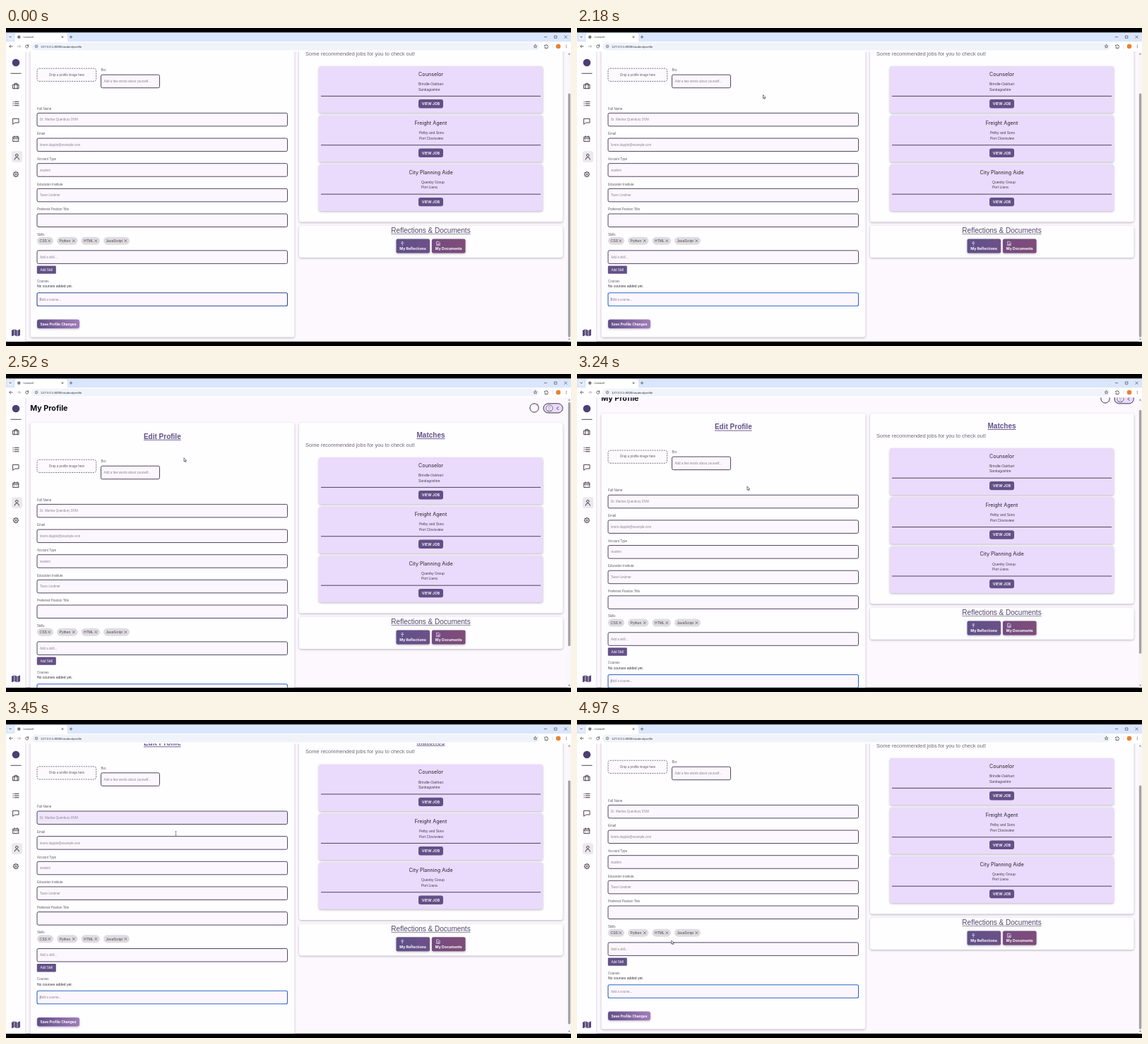
These frames come from a looping animation (800 px wide and 450 px high, 5 s). An HTML page with a canvas:

```html
<!DOCTYPE html>
<html lang="en">
<head>
<meta charset="utf-8">
<title>Profile</title>
<style>
html, body { margin: 0; width: 100%; height: 100%; overflow: hidden; background: #000; }
canvas { display: block; width: 800px; height: 450px; }
</style>
</head>
<body>
<canvas id="stage"></canvas>
<script>
const LOOP = 5000, MAX_SCROLL = 64;
const SANS = '"Liberation Sans", Arial, sans-serif', INTER = 'Inter, sans-serif';
const INK = '#3b3450', PURPLE = '#635087', GREY = '#8a8590';

const canvas = document.getElementById('stage');
const ctx = canvas.getContext('2d');
const dpr = window.devicePixelRatio || 1;
canvas.width = 800 * dpr;
canvas.height = 450 * dpr;

const clamp = v => Math.max(0, Math.min(1, v));
const lerp = (a, b, u) => a + (b - a) * u;
const ease = u => { u = clamp(u); return u * u * (3 - 2 * u); };
const mix = (a, b, u) => `rgb(${a.map((v, i) => Math.round(lerp(v, b[i], u)))})`;

function box(x, y, w, h, r, fill, stroke, lw = 1) {
  ctx.beginPath();
  ctx.roundRect(x, y, w, h, r);
  if (fill) { ctx.fillStyle = fill; ctx.fill(); }
  if (stroke) { ctx.strokeStyle = stroke; ctx.lineWidth = lw; ctx.stroke(); }
}

function raised(x, y, w, h, r, fill) {
  ctx.save();
  ctx.shadowColor = 'rgba(40,30,60,.32)';
  ctx.shadowBlur = 3 * dpr;
  ctx.shadowOffsetY = dpr;
  box(x, y, w, h, r, fill);
  ctx.restore();
}

function text(s, x, y, size, color, { font = SANS, weight = 400, align = 'left', line = false } = {}) {
  ctx.font = `${weight} ${size}px ${font}`;
  ctx.textAlign = align;
  ctx.fillStyle = color;
  ctx.fillText(s, x, y);
  if (line) {
    const w = ctx.measureText(s).width;
    ctx.fillRect(align === 'center' ? x - w / 2 : x, y + 1.2, w, weight > 500 ? 0.9 : 0.6);
  }
}

function dot(x, y, r, fill, stroke, lw = 1) {
  ctx.beginPath();
  ctx.arc(x, y, r, 0, 7);
  if (fill) { ctx.fillStyle = fill; ctx.fill(); }
  if (stroke) { ctx.strokeStyle = stroke; ctx.lineWidth = lw; ctx.stroke(); }
}

// Paths are drawn around (0, 0).
function icon(d, x, y, color, lw = 1, fill) {
  ctx.save();
  ctx.translate(x, y);
  const p = new Path2D(d);
  ctx.lineCap = ctx.lineJoin = 'round';
  if (fill) { ctx.fillStyle = fill; ctx.fill(p); }
  if (color) { ctx.strokeStyle = color; ctx.lineWidth = lw; ctx.stroke(p); }
  ctx.restore();
}

function gradient(x0, x1, a, b) {
  const g = ctx.createLinearGradient(x0, 0, x1, 0);
  g.addColorStop(0, a);
  g.addColorStop(1, b);
  return g;
}

// Page content, in unscrolled coordinates
const row = i => 184.4 + 35.65 * i;
const fields = [
  { x: 134.5, y: 130.2, w: 83, label: 'Bio:', hint: 'Add a few words about yourself...' },
  ...[
    ['Full Name', 'Dr. Marlow Quenbury DVM'],
    ['Email', 'lorem.dapple@example.com'],
    ['Account Type', 'student'],
    ['Education Institute', 'Tavor-Lindmer'],
    ['Preferred Position Title', '']
  ].map(([label, hint], i) => ({ x: 44, y: row(i), w: 354.5, label, hint })),
  { x: 44, y: 378.9, w: 354.5, hint: 'Add a skill...' },
  { x: 44, y: 438.7, w: 354.5, hint: 'Add a course...', focus: true }
];
const FIELD_H = 18.5;

const chips = [['CSS', 44, 67], ['Python', 72, 101.5], ['HTML', 106.5, 133], ['JavaScript', 138, 175]];
const jobs = [
  ['Counselor', 'Brindle-Oakhart', 'Santiagoshire', 584],
  ['Freight Agent', 'Pelby and Sons', 'Port Clovisview', 585],
  ['City Planning Aide', 'Quenby Group', 'Port Liana', 588]
];

// Motion
function scrollAt(t) {
  if (t < 2800) return MAX_SCROLL * (1 - ease((t - 2200) / 310));
  return MAX_SCROLL * ease((t - 3113) / 439);
}

const SHOW_POINTER = 1900;
const trail = [
  [1900, 200, 108], [2180, 263.5, 95], [2520, 252, 119], [3200, 241, 159.3],
  [3450, 240.5, 160], [3850, 240.5, 160], [4850, 133.8, 312.2]
];

function pointerAt(t) {
  let i = 0;
  while (i < trail.length - 2 && t > trail[i + 1][0]) i++;
  const [a, b] = [trail[i], trail[i + 1]];
  const u = ease((t - a[0]) / (b[0] - a[0]));
  return [lerp(a[1], b[1], u), lerp(a[2], b[2], u)];
}

function hits(f, t) {
  if (t < SHOW_POINTER) return false;
  const [x, y] = pointerAt(t), top = f.y - scrollAt(t);
  return x > f.x && x < f.x + f.w && y > top && y < top + FIELD_H;
}

// Hover follows the pointer late and fades over 100 ms.
function hover(f, t) {
  let n = 0;
  for (let d = 65; d < 165; d += 10) n += hits(f, t - d);
  return n / 10;
}

function drawField(f, t) {
  if (f.label) text(f.label, f.x, f.y - 4.8, 4.45, '#625d69');
  const fill = mix([252, 247, 254], [237, 226, 250], hover(f, t));
  const edge = f.focus ? mix([45, 50, 100], [44, 104, 196], clamp((t + 70) / 170)) : INK;
  box(f.x, f.y, f.w, FIELD_H, 2, fill, edge, f.focus ? 1.1 : 0.9);
  text(f.hint, f.x + 3.9, f.y + 10.9, 4.5, GREY);
  if (f.focus && t % 1000 < 500) {
    ctx.fillStyle = '#555';
    ctx.fillRect(f.x + 3.9, f.y + 6.7, 0.5, 5);
  }
}

function drawForm(t) {
  raised(34.5, 69, 374, 432.5, 3, '#fefdff');
  text('Edit Profile', 221.3, 91.6, 10, PURPLE, { weight: 700, align: 'center', line: true });

  ctx.setLineDash([2, 1.3]);
  box(44, 121.2, 83.7, 18.2, 3, '#fdfaff', '#57515f', 0.8);
  ctx.setLineDash([]);
  text('Drop a profile image here', 86, 131.6, 4.45, '#625d69', { align: 'center' });

  fields.forEach(f => drawField(f, t));

  text('Skills', 44, 357.6, 4.45, '#625d69');
  for (const [name, a, b] of chips) {
    box(a, 359.7, b - a, 11, 5.5, '#dedce0');
    text(name, a + 3.6, 367, 5, '#45414b');
    icon('M-1.6-1.6L1.6 1.6M1.6-1.6L-1.6 1.6', b - 5.7, 365.2, '#55505c', 0.7);
  }
  box(43.8, 400.5, 27, 11.3, 1.2, PURPLE);
  text('Add Skill', 57.3, 407.7, 4.5, '#fff', { align: 'center' });

  text('Courses', 44, 423.5, 4.45, '#625d69');
  text('No courses added yet.', 44, 431.2, 5, '#353139');

  raised(44, 476.5, 60, 12.4, 3, gradient(44, 104, '#624e88', '#a27db9'));
  text('Save Profile Changes', 74, 484.5, 4.9, '#fff', { font: INTER, weight: 700, align: 'center' });
}

function drawJob([title, firm, place, x], i) {
  const y = 118.3 + 69.4 * i;
  raised(443, y, 317, 66, 3, '#eadafb');
  text(title, 601.5, y + 13.4, 7.2, '#27222f', { font: INTER, align: 'center' });
  text(firm, x, y + 26.7, 5, '#45404f');
  text(place, x, y + 34.2, 5, '#45404f');
  ctx.fillStyle = INK;
  ctx.fillRect(446, y + 41.6, 311, 0.9);
  box(584, y + 46.8, 35, 12.4, 3, PURPLE);
  text('VIEW JOB', 601.5, y + 54.9, 5.2, '#fff', { font: INTER, weight: 600, align: 'center' });
}

function drawSide() {
  raised(415, 69, 373.5, 269.5, 3, '#fefdff');
  text('Matches', 601.5, 90, 10, PURPLE, { weight: 700, align: 'center', line: true });
  text('Some recommended jobs for you to check out!', 424, 102.8, 7.5, '#6f6a76');
  jobs.forEach(drawJob);

  raised(415, 344, 373.5, 45, 3, '#fefdff');
  text('Reflections & Documents', 601.5, 354.2, 10, '#51486a', { align: 'center', line: true });
  raised(552.5, 362.6, 47.5, 20, 2, gradient(552, 600, '#5f5089', '#6d5088'));
  raised(603, 362.6, 47.5, 20, 2, gradient(603, 651, '#734c80', '#7f4c79'));
  const label = { font: INTER, weight: 700 };
  text('My Reflections', 557.3, 378.2, 5.15, '#fff', label);
  text('My Documents', 607.8, 378.2, 5.15, '#fff', label);
  icon('M0 2.6V-1M-1.7-.6H1.7M-.8-2.4H.8', 561.2, 369, '#f0e8f8', 0.7);
  icon('M-2-2.8H.7L2.2-1.3V2.8H-2ZM-.8.2H1M-.8 1.5H1', 612, 369, '#f0e8f8', 0.7);
}

function drawHeading() {
  text('My Profile', 34.3, 51.6, 10.7, '#0e0c12', { font: INTER, weight: 700 });
  dot(748, 48, 6.2, '#fbf6ff', INK, 1);
  dot(752.3, 43.4, 1.2, '#d8606f');
  box(761, 41.8, 27.3, 13.2, 6.6, '#eadafb', INK, 1);
  dot(769.4, 48.4, 4.6, '#f4eefa', INK, 0.7);
  dot(769.4, 47.4, 1.5, null, '#77707f', 0.6);
  icon('M-2.6 1.9Q0-.8 2.6 1.9', 769.4, 49.9, '#77707f', 0.6);
  icon('M1-2L-1 0L1 2', 781, 48.5, INK, 1);
}

function drawPage(t) {
  const s = scrollAt(t);
  ctx.save();
  ctx.beginPath();
  ctx.rect(0, 33, 800, 410.7);
  ctx.clip();
  ctx.fillStyle = '#fcf8fe';
  ctx.fillRect(0, 33, 800, 411);
  ctx.translate(0, -s);
  drawHeading();
  drawForm(t);
  drawSide();
  ctx.restore();

  ctx.fillStyle = '#f8f6fa';
  ctx.fillRect(795, 33, 5, 410.7);
  box(795.9, 40 + 0.82 * s, 3.3, 345, 1.6, '#a3a1a6');
  icon('M-1.4 1L0-1L1.4 1Z', 797.5, 36.6, null, 0, '#77757a');
  icon('M-1.4-1L0 1L1.4-1Z', 797.5, 440.7, null, 0, '#77757a');
}

function drawNav() {
  ctx.fillStyle = '#fefdff';
  ctx.fillRect(0, 33, 28, 410.7);
  ctx.fillStyle = '#d9d5df';
  ctx.fillRect(27.5, 33, 0.8, 410.7);
  dot(14, 49, 5.3, '#4c3f73');
  ctx.fillStyle = '#39343f';
  ctx.fillRect(6.5, 63.8, 15, 0.9);
  box(8, 174.3, 15, 15.6, 3, '#ebe8ee');
  const c = '#35303b';
  icon('M-4-2.2H4V3.4H-4ZM-1.7-2.2V-4H1.7V-2.2M-2-2.2V3.4M2-2.2V3.4', 14, 82.3, c, 0.9);
  icon('M-1.8-2.8H4M-1.8 0H4M-1.8 2.8H4M-4-2.8H-3.7M-4 0H-3.7M-4 2.8H-3.7', 14, 107, c, 1.1);
  icon('M-4-3.4H4V2.2H-1.2L-4 4.2Z', 14, 131.8, c, 0.9);
  icon('M-3.8-2.8H3.8V3.8H-3.8ZM-3.8-.6H3.8M-1.9-4V-2.2M1.9-4V-2.2M-1.6 1.6H-1.5M1.5 1.6H1.6', 14, 156.8, c, 0.9);
  dot(15.3, 180.2, 1.8, null, c, 0.9);
  icon('M-3.2 2Q-3-1.2 0-1.2T3.2 2', 15.3, 184.2, c, 0.9);
  dot(14, 207, 3.2, null, c, 0.9);
  dot(14, 207, 1.1, null, c, 0.8);
  for (let i = 0; i < 8; i++) {
    const a = i * Math.PI / 4;
    dot(14 + 3.7 * Math.cos(a), 207 + 3.7 * Math.sin(a), 0.6, c);
  }
  icon('M-6-3.6L-2.4-5V3.6L-6 5ZM-1.7-5L1.7-3.6V5L-1.7 3.6ZM2.4-3.6L6-5V3.6L2.4 5Z', 14, 431.3, null, 0, '#584879');
}

function drawBrowser() {
  ctx.fillStyle = '#dae6fb';
  ctx.fillRect(0, 6.3, 800, 14);
  box(2.5, 8.4, 7.5, 8.4, 2, '#e8effc');
  icon('M-1.3-.6L0 .7L1.3-.6', 6.2, 12.6, '#333', 0.8);
  box(12.5, 7.6, 74.5, 13, [3, 3, 0, 0], '#fff');
  dot(18.3, 12.8, 2.2, '#777b82');
  text('- Laravel', 22.3, 14.3, 4.3, '#30333a');
  icon('M-1-1L1 1M1-1L-1 1', 80, 12.7, '#333', 0.7);
  icon('M-1.8 0H1.8M0-1.8V1.8', 92, 12.7, '#444', 0.7);
  icon('M-1.8 0H1.8', 764, 12.7, '#333', 0.6);
  icon('M-1.6-1.6H1.6V1.6H-1.6Z', 778.3, 12.7, '#333', 0.6);
  icon('M-1.7-1.7L1.7 1.7M1.7-1.7L-1.7 1.7', 792.5, 12.7, '#333', 0.6);

  ctx.fillStyle = '#fff';
  ctx.fillRect(0, 19.3, 800, 14);
  box(36, 20.8, 719, 10.8, 5.4, '#f0f3fa');
  icon('M2.2 0H-2.2M-.4-1.8L-2.2 0L-.4 1.8', 7, 26, '#444', 0.8);
  icon('M-2.2 0H2.2M.4-1.8L2.2 0L.4 1.8', 18.3, 26, '#aaa', 0.8);
  icon('M1.7-1.2A2.1 2.1 0 1 0 2.1.3M2-2.3V-.8H.5', 29.7, 26, '#444', 0.8);
  dot(43, 26, 1.9, null, '#555', 0.6);
  icon('M0-.1V1M0-1V-.9', 43, 26, '#555', 0.6);
  text('127.0.0.1:8000/student/profile', 49, 27.6, 4.4, '#2c2f36');
  icon('M0-2.5L.7-.8L2.5-.7L1.1.4L1.6 2.2L0 1.2L-1.6 2.2L-1.1.4L-2.5-.7L-.7-.8Z', 749.5, 26, '#444', 0.6);
  icon('M-2-1.5H-.7Q0-3.5.7-1.5H2V0Q3.3.7 2 1.3V2.6H-2V1.3Q-.8.6-2 0Z', 765, 25.9, '#444', 0.8);
  ctx.fillStyle = '#c8d5ee';
  ctx.fillRect(773.7, 23, 0.6, 6);
  dot(782, 26, 3.3, '#e9822f');
  for (const d of [-1.7, 0, 1.7]) dot(793.3, 26 + d, 0.55, '#444');
}

function drawPointer(t) {
  if (t < SHOW_POINTER) return;
  const [x, y] = pointerAt(t);
  if (fields.some(f => hover(f, t) > 0.5)) {
    icon('M-.8-2.6H.8M0-2.6V2.6M-.8 2.6H.8', x, y + 0.4, '#444', 0.5);
  } else {
    icon('M0 0V4.9L1.1 3.9L1.9 5.6L2.6 5.3L1.9 3.6H3.4Z', x, y, '#222', 0.6, '#fff');
  }
}

function draw(now) {
  const t = now % LOOP;
  ctx.setTransform(dpr, 0, 0, dpr, 0, 0);
  ctx.fillStyle = '#000';
  ctx.fillRect(0, 0, 800, 450);
  drawPage(t);
  drawNav();
  drawBrowser();
  drawPointer(t);
}

const start = performance.now();
function frame() {
  draw(performance.now() - start);
  requestAnimationFrame(frame);
}
frame();
</script>
</body>
</html>
```
